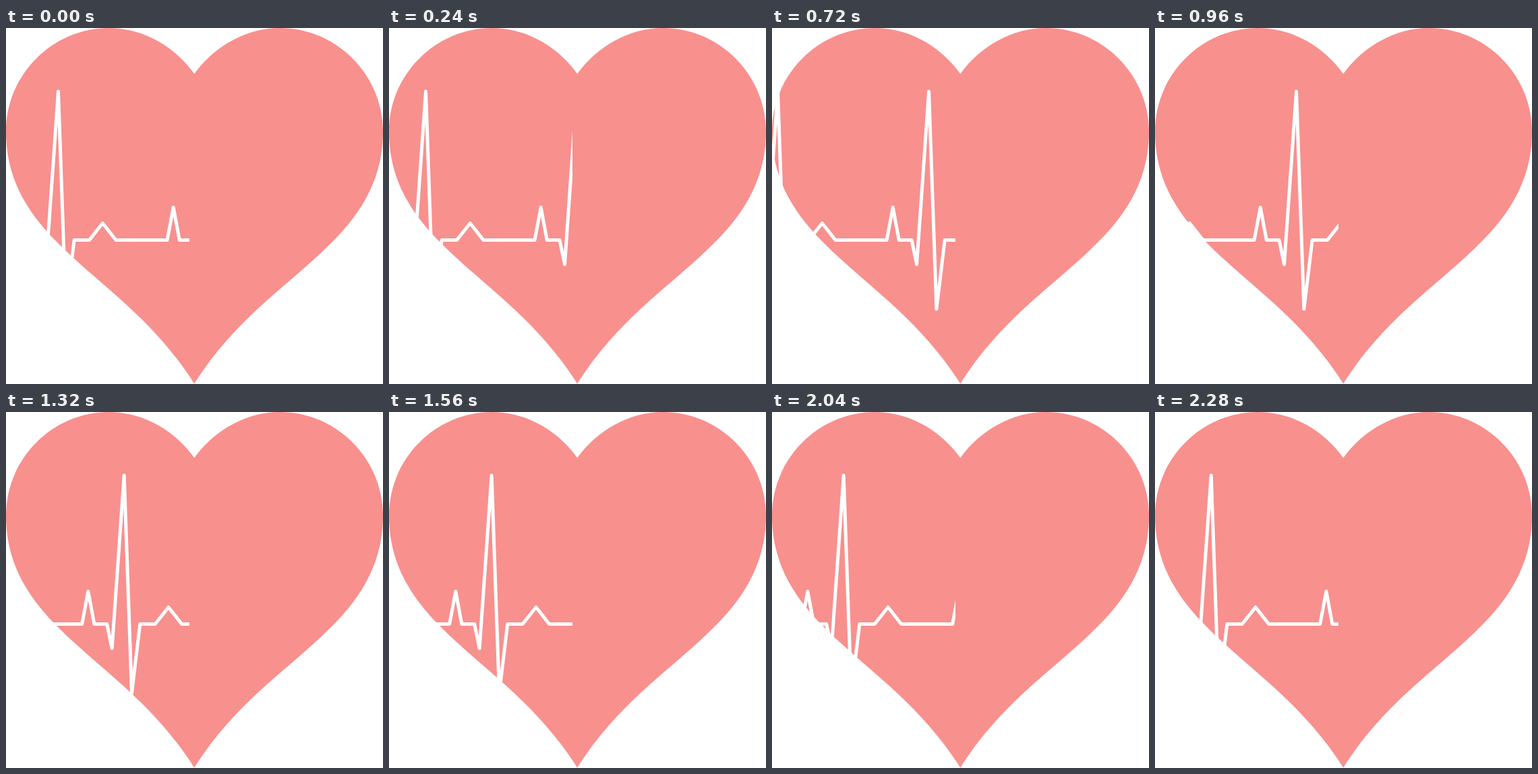
An HTML page that plays this animation: 559x528 px, repeating every 2340 ms.

```html
<!DOCTYPE html>
<html lang="en">
<head>
<meta charset="utf-8">
<title>Heartbeat</title>
<style>
  html, body { margin: 0; width: 100%; height: 100%; overflow: hidden; background: #fff; }
  svg { display: block; }
</style>
</head>
<body>
<svg width="559" height="528" viewBox="0 0 559 528">
  <clipPath id="window"><rect width="272" height="528"/></clipPath>
  <path fill="#f8908e" d="M279.2 68 C250 27 203 0 153 0 C69 0 0 69 0 154
    C0 222 31 273 75 317 C139 382 216 428 279.2 527.5
    C342 428 420 382 484 317 C528 273 559 222 559 154
    C559 69 490 0 406 0 C356 0 309 27 279.2 68Z"/>
  <g clip-path="url(#window)">
    <path id="trace" fill="none" stroke="#fff" stroke-width="5" stroke-linejoin="round"/>
  </g>
</svg>
<script>
  const STEP = 60, STEPS = 39, PERIOD = 224, START = 77.5, BASE = 314.5;

  // One beat, x measured from the tall peak
  const beat = [
    [-62.5, BASE], [-53.3, 266], [-44.3, BASE], [-25.5, BASE], [-18, 350.5],
    [0, 94], [11.3, 417], [23.6, BASE], [46, BASE], [65.8, 289.5], [85.5, BASE]
  ];

  const points = [];
  for (let k = 0; k < 3; k++)
    for (const [x, y] of beat) points.push(`${x + k * PERIOD} ${y}`);

  const trace = document.getElementById("trace");
  trace.setAttribute("d", "M" + points.join("L"));

  function draw(ms) {
    const step = Math.floor(Math.max(0, ms) / STEP) % STEPS;
    const x = START - PERIOD * step / STEPS;
    trace.setAttribute("transform", `translate(${x.toFixed(2)} 0)`);
  }

  const begin = performance.now();
  function tick() {
    draw(performance.now() - begin);
    requestAnimationFrame(tick);
  }
  tick();
</script>
</body>
</html>
```
